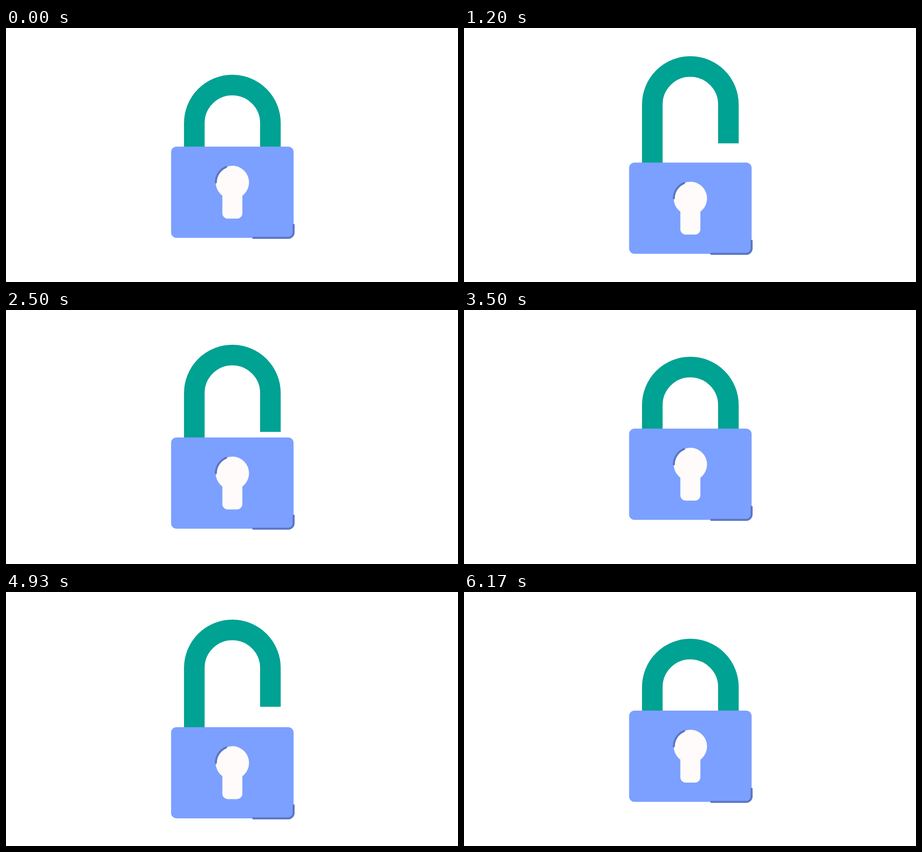
These frames come from a looping animation (998 by 561 pixels, 6910 ms). An HTML page:

```html
<!DOCTYPE html>
<html lang="en">
<head>
<meta charset="utf-8">
<title>Padlock</title>
<style>
  html, body { margin: 0; width: 100%; height: 100%; overflow: hidden; background: #fff; }
  svg { display: block; width: 100%; height: 100%; }
  .edge { fill: none; stroke: #5b76c4; stroke-width: 4.5; stroke-linecap: round; stroke-linejoin: round; }
</style>
</head>
<body>
<svg viewBox="0 0 998 561">
  <path id="shackle" d="M415.8 390V210a84 84 0 0 1 168 0V295.7" fill="none" stroke="#00a293" stroke-width="45.5"/>
  <g id="body">
    <rect x="364.5" y="262" width="270.5" height="201.5" rx="12" fill="#7ca0ff"/>
    <g fill="#fffbfa">
      <circle cx="499.8" cy="341" r="36.8"/>
      <rect x="477.7" y="341" width="44.2" height="80" rx="12"/>
    </g>
    <path class="edge" d="M463.3 341A36.8 36.8 0 0 1 486 307"/>
    <path class="edge" d="M546 463.5H623a12 12 0 0 0 12-12V434.8"/>
  </g>
</svg>
<script>
const LOOP = 6910, CYCLE = 3467;
const OPEN_END = 1600, CLOSE_START = 1833, CLOSE_END = 2700;
const shackle = document.getElementById('shackle');
const body = document.getElementById('body');

// Cubic Bezier easing through (x1, 0) and (x2, 1), solved by bisection.
function ease(x, x1, x2) {
  if (x <= 0) return 0;
  if (x >= 1) return 1;
  let lo = 0, hi = 1, s;
  for (let i = 0; i < 30; i++) {
    s = (lo + hi) / 2;
    const v = 1 - s;
    if (3 * v * v * s * x1 + 3 * v * s * s * x2 + s ** 3 < x) lo = s; else hi = s;
  }
  return s * s * (3 - 2 * s);
}

function openness(t, closeEase) {
  const opened = ease(t / OPEN_END, 0.48, 0.1);
  const closed = ease((t - CLOSE_START) / (CLOSE_END - CLOSE_START), closeEase, 1);
  return opened - closed;
}

const shift = (el, y) => el.setAttribute('transform', `translate(0 ${y.toFixed(3)})`);

function draw() {
  const time = performance.now() % LOOP;
  const t = time < CYCLE ? time : time - CYCLE;
  shift(shackle, -42.4 * openness(t, 0.93));
  shift(body, 36.5 * openness(t, 0.78));
  requestAnimationFrame(draw);
}
draw();
</script>
</body>
</html>
```
